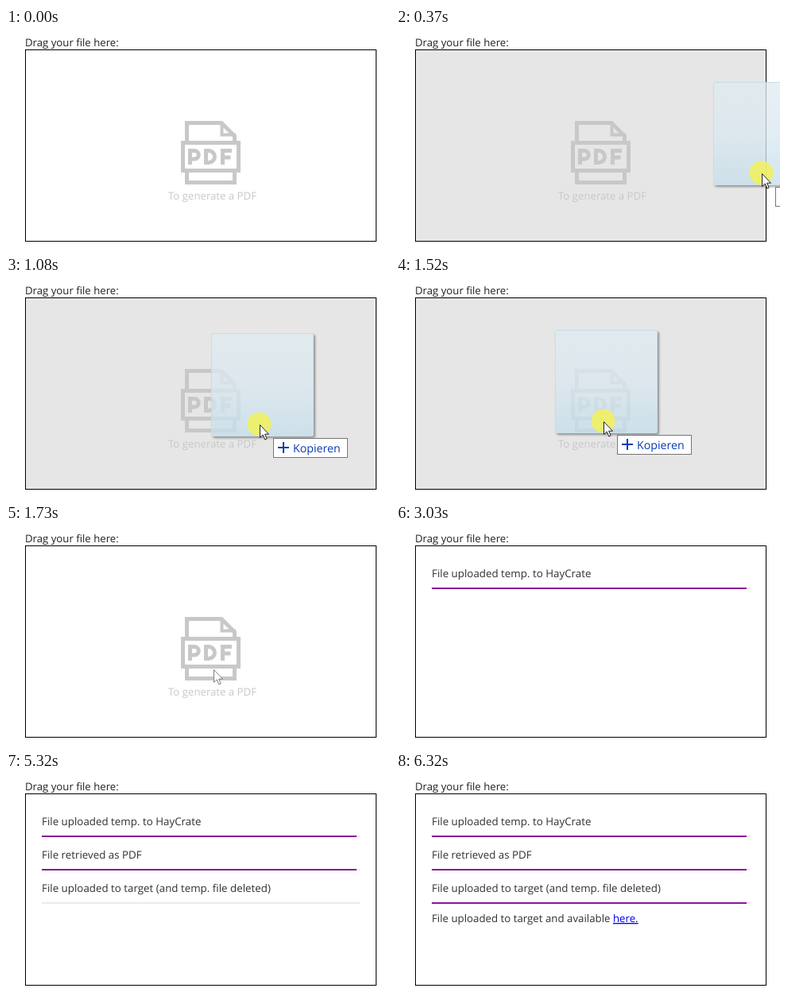
Write an HTML page that moves like this. It is 483 px wide and 277 px high and loops after 8260 ms.

```html
<!DOCTYPE html>
<html lang="en">
<head>
<meta charset="utf-8">
<title>Drop a file to make a PDF</title>
<style>
  html, body { margin: 0; width: 100%; height: 100%; overflow: hidden; background: #fff; }
  #stage { position: relative; width: 483px; height: 277px; overflow: hidden; }
  svg { position: absolute; left: 0; top: 0; overflow: visible; }
  text { font: 13.2px "Open Sans", "Noto Sans", sans-serif; fill: #222; text-rendering: geometricPrecision; }

  /* Every animation shares one 8260 ms timeline: percentage = ms / 82.6 */
  .area, .icon, .drag, .held, .arrow, .row, .bar { animation: 8260ms step-end infinite; }

  .area { fill: #fff; stroke: #000; animation-name: hover; }
  .icon { fill: none; stroke: #c8c8c8; animation-name: icon; }
  .icon text { fill: #c8c8c8; stroke: none; }

  .drag { position: absolute; left: 0; top: 0; width: 0; height: 0; animation-name: move; }
  .held { animation-name: held; }
  .tile {
    position: absolute; left: -61px; top: -115px; width: 127px; height: 128px;
    border: 1px solid rgba(196, 222, 234, .8); border-radius: 3px;
    background: linear-gradient(rgba(223, 235, 241, .76), rgba(218, 232, 240, .76) 50%, rgba(197, 222, 234, .76));
    box-shadow: 2px 2px 3px rgba(0, 0, 0, .38);
  }
  .spot { fill: #f0f062; fill-opacity: .9; }
  .tip { fill: #fff; stroke: #767676; }
  .plus { stroke: #0a3cb4; stroke-width: 2; }
  .tip-text { font-size: 14.2px; fill: #0a3cb4; }
  .arrow { fill: #fff; stroke: #222; animation-name: arrow; }

  .row text { font-size: 13.35px; fill: #323130; }
  .row .last { font-size: 13.28px; }
  .link { fill: #00e; text-decoration: underline; }
  .track { fill: #eaeaea; }
  .bar { fill: #881798; transform-box: fill-box; transform-origin: 0 0; }
  .r1 { animation-name: show1; } .r1 .bar { animation-name: grow1; }
  .r2 { animation-name: show2; } .r2 .bar { animation-name: grow2; }
  .r3 { animation-name: show3; } .r3 .bar { animation-name: grow3; }
  .r4 { animation-name: show4; }

  @keyframes hover { 0% { fill: #fff } 4.47% { fill: #e6e6e6 } 20.94%, to { fill: #fff } }
  @keyframes icon { 0% { visibility: visible } 32.2%, to { visibility: hidden } }
  @keyframes held { 0% { visibility: visible } 20.09%, to { visibility: hidden } }
  @keyframes arrow {
    0% { stroke: #222; visibility: visible }
    20.94% { stroke: #808080; visibility: visible }
    25.3%, to { stroke: #808080; visibility: hidden }
  }
  @keyframes move {
    0% { transform: translate(620px, 179px) }
    .84% { transform: translate(541px, 180px); animation-timing-function: steps(4) }
    4.47% { transform: translate(460px, 183px); animation-timing-function: steps(7) }
    10.41% { transform: translate(354px, 186px); animation-timing-function: steps(3) }
    13.07% { transform: translate(319px, 187px); animation-timing-function: steps(6) }
    18.4% { transform: translate(261px, 183px) }
    23.48% { transform: translate(304px, 184px) }
    24.33%, to { transform: translate(384px, 185px) }
  }

  @keyframes show1 { 0% { visibility: hidden } 32.2%, to { visibility: visible } }
  @keyframes show2 { 0% { visibility: hidden } 52.17%, to { visibility: visible } }
  @keyframes show3 { 0% { visibility: hidden } 64.4%, to { visibility: visible } }
  @keyframes show4 { 0% { visibility: hidden } 76.51%, to { visibility: visible } }

  @keyframes grow1 {
    0% { transform: scaleX(0) } 33.09% { transform: scaleX(.3) } 33.99% { transform: scaleX(.73) }
    34.88% { transform: scaleX(.93) } 35.78% { transform: scaleX(.99) } 36.68%, to { transform: none }
  }
  @keyframes grow2 {
    0% { transform: scaleX(0) } 53.05% { transform: scaleX(.3) } 53.92% { transform: scaleX(.73) }
    54.79% { transform: scaleX(.93) } 55.66% { transform: scaleX(.99) } 56.53%, to { transform: none }
  }
  @keyframes grow3 {
    0% { transform: scaleX(0) } 65.29% { transform: scaleX(.1) } 66.18% { transform: scaleX(.41) }
    67.07% { transform: scaleX(.79) } 67.95% { transform: scaleX(.95) }
    68.84% { transform: scaleX(.99) } 69.73%, to { transform: none }
  }
</style>
</head>
<body>
<div id="stage">
  <svg width="483" height="277">
    <text x="24" y="23">Drag your file here:</text>
    <rect class="area" x="24.5" y="27.5" width="441" height="241"/>

    <g class="icon">
      <path stroke-width="5" d="M227.5 143V119.500H271L287.500 136V143M227.500 181V194.500H287.500V181"/>
      <path stroke-width="4" d="M271.500 118V134.500H289"/>
      <rect stroke-width="5" x="222.500" y="144.500" width="70" height="35"/>
      <path stroke-width="5" d="M231.500 172V154.500H237a4.500 4.500 0 0 1 0 10.500H231.500
        M251.500 154.500H255a7.500 7.500 0 0 1 0 15H251.500Z
        M272.500 172V154.500H284M272.500 163H282.500"/>
      <text x="204" y="216">To generate a PDF</text>
    </g>

    <g class="row r1">
      <text x="45" y="67">File uploaded temp. to HayCrate</text>
      <rect class="track" x="45" y="80" width="400" height="2"/>
      <rect class="bar" x="45" y="80" width="396" height="2"/>
    </g>
    <g class="row r2">
      <text x="45" y="109">File retrieved as PDF</text>
      <rect class="track" x="45" y="122" width="400" height="2"/>
      <rect class="bar" x="45" y="122" width="396" height="2"/>
    </g>
    <g class="row r3">
      <text x="45" y="151">File uploaded to target (and temp. file deleted)</text>
      <rect class="track" x="45" y="164" width="400" height="2"/>
      <rect class="bar" x="45" y="164" width="396" height="2"/>
    </g>
    <g class="row r4">
      <text class="last" x="45" y="189">File uploaded to target and available <tspan class="link">here.</tspan></text>
    </g>
  </svg>

  <div class="drag">
    <div class="held tile"></div>
    <svg width="1" height="1">
      <g class="held">
        <circle class="spot" cx="-.5" cy="-.5" r="15"/>
        <rect class="tip" x="17.5" y="17.5" width="93" height="24"/>
        <path class="plus" d="M23 29H37M30 22V36"/>
        <text class="tip-text" x="42" y="35">Kopieren</text>
      </g>
      <path class="arrow" d="M.5 .5V16.500L4.200 13L6.800 19L9.200 18L6.600 12.200H11.500Z"/>
    </svg>
  </div>
</div>
</body>
</html>
```
